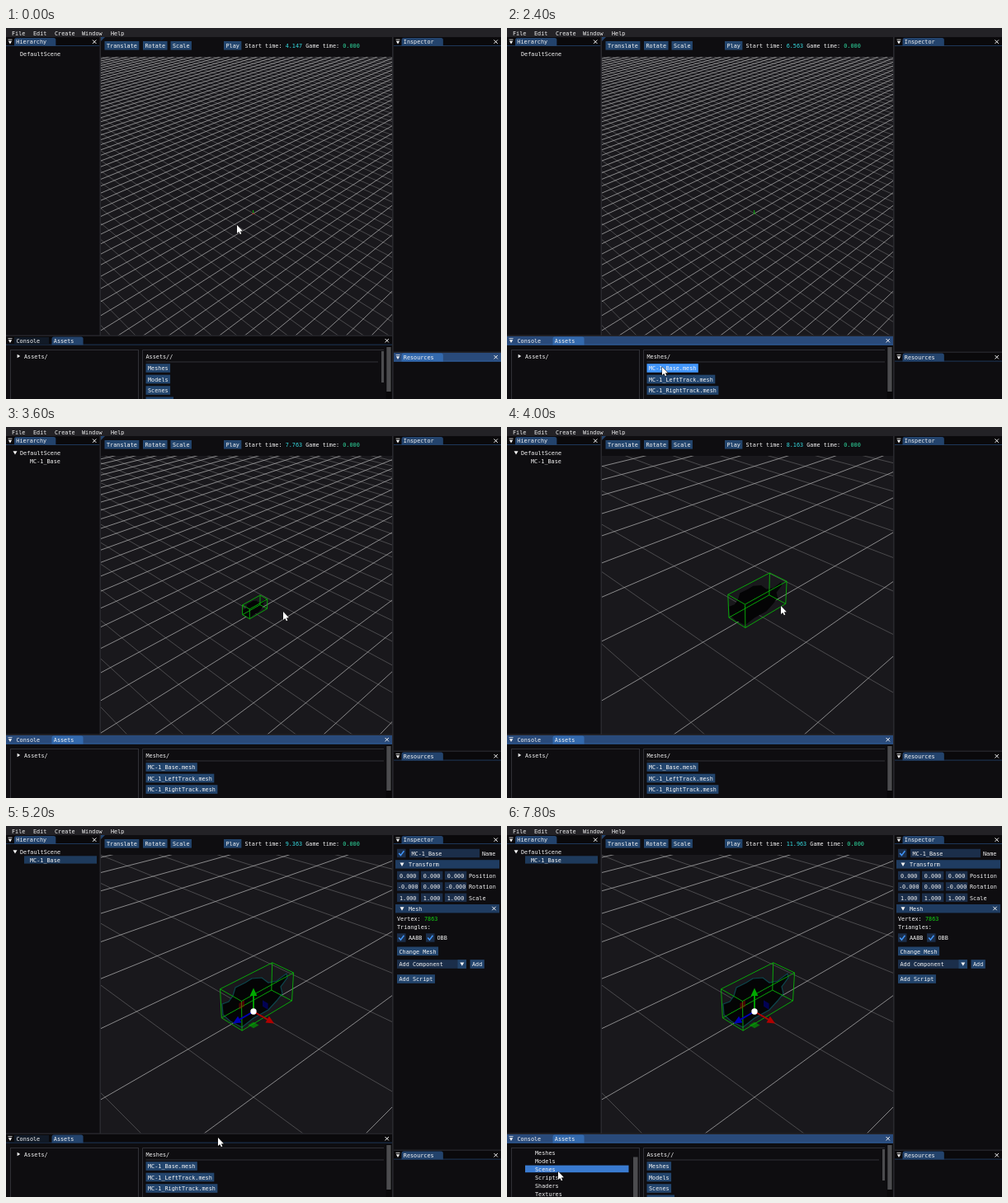
These frames come from a looping animation (600x450 px, 8000 ms). An HTML page with a canvas:

```html
<!DOCTYPE html>
<html lang="en">
<head>
<meta charset="utf-8">
<title>Scene editor</title>
<style>
html, body { margin: 0; width: 100%; height: 100%; overflow: hidden; background: #0e0d10; }
canvas { display: block; width: 600px; height: 450px; }
</style>
</head>
<body>
<canvas id="stage" width="600" height="450"></canvas>
<script>
const ctx = document.getElementById('stage').getContext('2d');
const LOOP = 8000, STEP = 200, FOCAL = 543;
const CHAR = 4.095;
const WHITE = '#f4f4f4', PANEL = '#0e0d10', BUTTON = '#23456d', BAR = '#294a7a';
const TAB = '#23436c', TAB_ON = '#3369ad', FRAME = '#1b2e4a', EDGE = '#303036';

// Moments at which the interface changes, in ms
const AT = { folder: 2200, drop: 2800, select: 4800, tree: 7000, scroll: 7400 };

// time, x, y
const cursorPath = [
  [0, 280, 239], [600, 262, 264], [1200, 190, 388], [1600, 181, 404], [2000, 184, 410],
  [2400, 188, 411], [2800, 300, 238], [3200, 340, 231], [4000, 332, 217],
  [4600, 306, 212], [5200, 257, 378], [6000, 100, 388], [6800, 14, 396],
  [7200, 15, 397], [7800, 62, 419]
];
// time, camera coordinate on all three axes, in grid cells
const NEAREST = 3.13;
const zoomPath = [[0, 20], [3200, 20], [3400, 14], [3600, 9], [3800, 5.8], [4000, 3.88], [4200, NEAREST]];

// Model silhouette at the nearest zoom
const body = [
  [262, 216], [270, 213], [275, 206], [278, 196], [290, 190], [298, 185], [310, 184],
  [318, 190], [328, 188], [340, 179], [341, 184], [333, 195], [335, 203], [328, 212],
  [318, 223], [300, 233], [286, 244], [272, 237], [263, 229]
];

function sample(path, t) {
  const i = path.findIndex(p => p[0] > t);
  if (i < 0) return path[path.length - 1].slice(1);
  const a = path[i - 1], b = path[i], k = (t - a[0]) / (b[0] - a[0]);
  return a.slice(1).map((v, j) => v + (b[j + 1] - v) * k);
}

function box(x0, y0, x1, y1, color) {
  ctx.fillStyle = color;
  ctx.fillRect(x0, y0, x1 - x0, y1 - y0);
}

function outline(x0, y0, x1, y1) {
  ctx.strokeStyle = EDGE;
  ctx.lineWidth = 1;
  ctx.strokeRect(x0 + .5, y0 + .5, x1 - x0, y1 - y0);
}

// Large type scaled down keeps fractional advances
function text(str, x, cy, color = WHITE) {
  ctx.save();
  ctx.translate(x, cy + 2.7);
  ctx.scale(.1, .1);
  ctx.font = '68px "DejaVu Sans Mono", monospace';
  ctx.fillStyle = color;
  ctx.fillText(str, 0, 0);
  ctx.restore();
}

function line(points, color, width = 1, close = false) {
  ctx.beginPath();
  points.forEach(p => ctx.lineTo(p[0], p[1]));
  if (close) ctx.closePath();
  ctx.strokeStyle = color;
  ctx.lineWidth = width;
  ctx.stroke();
}

function poly(points, color) {
  ctx.beginPath();
  points.forEach(p => ctx.lineTo(p[0], p[1]));
  ctx.closePath();
  ctx.fillStyle = color;
  ctx.fill();
}

function clip(x0, y0, x1, y1, paint) {
  ctx.save();
  ctx.beginPath();
  ctx.rect(x0, y0, x1 - x0, y1 - y0);
  ctx.clip();
  paint();
  ctx.restore();
}

const arrowDown = (x, y, r = 2.5) => poly([[x - r, y - r * .75], [x + r, y - r * .75], [x, y + r]], WHITE);
const arrowRight = (x, y) => poly([[x - 1.4, y - 2.2], [x + 2.2, y], [x - 1.4, y + 2.2]], WHITE);

function cross(x, y) {
  line([[x - 2.2, y - 2.2], [x + 2.2, y + 2.2]], WHITE);
  line([[x + 2.2, y - 2.2], [x - 2.2, y + 2.2]], WHITE);
}

function button(label, x, cy, mouse) {
  const x1 = x + label.length * CHAR + 5;
  const hot = mouse[0] > x && mouse[0] < x1 && Math.abs(mouse[1] - cy) < 5.3;
  box(x, cy - 5.3, x1, cy + 5.3, hot ? '#4296fa' : BUTTON);
  text(label, x + 2.5, cy);
}

function check(x, cy) {
  box(x, cy - 5.2, x + 10.5, cy + 5.2, FRAME);
  line([[x + 2.2, cy], [x + 4.4, cy + 2.6], [x + 8.4, cy - 2.8]], '#4296fa', 1.5);
}

function titleBar(x0, x1, y, focused, tabX, label) {
  const color = focused ? TAB_ON : TAB, tabEnd = tabX + label.length * CHAR + 13.5;
  box(x0, y, x1, y + 10.5, focused ? BAR : '#0a090b');
  box(x0, y + 9.7, x1, y + 10.5, color);
  ctx.fillStyle = color;
  ctx.beginPath();
  ctx.roundRect(tabX, y + .6, tabEnd - tabX, 9.9, [2.5, 2.5, 0, 0]);
  ctx.fill();
  arrowDown(x0 + 5, y + 5.9, 2.2);
  line([[x0 + 2.5, y + 2.6], [x0 + 7.5, y + 2.6]], WHITE, .8);
  text(label, tabX + 2.3, y + 5.2);
  cross(x1 - 6.3, y + 5.2);
}

function project(c, x, y, z) {
  const depth = (3 * c - x - y - z) / Math.sqrt(3), s = FOCAL / depth;
  return [300 + (x - z) / Math.SQRT2 * s, 225 - (2 * y - x - z) / Math.sqrt(6) * s];
}

function drawGrid(c) {
  for (let n = -80; n <= 80; n++) {
    const near = Math.min(300, 3 * c - n - .5);
    line([project(c, -400, 0, n), project(c, near, 0, n)], 'rgba(190,190,190,.38)', .8);
    line([project(c, n, 0, -400), project(c, n, 0, near)], 'rgba(205,205,205,.75)', .85);
  }
}

function drawModel(c, selected) {
  const k = NEAREST / c;
  const shape = body.map(([x, y]) => [300 + (x - 300) * k, 225 + (y - 225) * k]);
  poly(shape, '#040405');
  if (selected) line(shape, '#0c454c', 1.2, true);
  const ring = y => [[-.175, .36], [.175, .36], [.175, -.505], [-.175, -.505]]
    .map(([x, z]) => project(c, x, y, z));
  const low = ring(0), high = ring(.405);
  const green = '#08b408';
  line(low, green, .9, true);
  line(high, green, .9, true);
  low.forEach((p, i) => line([p, high[i]], green, .9));
}

function drawGizmo() {
  const X = [22, 12.7], Y = [0, -25], Z = [-22, 12.7];
  const at = (u, a, v = u, b = 0) => [300 + u[0] * a + v[0] * b, 225 + u[1] * a + v[1] * b];
  const plane = (u, v, color) =>
    poly([[.5, .5], [.8, .5], [.8, .8], [.5, .8]].map(([a, b]) => at(u, a, v, b)), color);
  plane(Y, Z, 'rgba(170,0,0,.42)');
  plane(X, Y, 'rgba(0,0,190,.42)');
  plane(Z, X, 'rgba(0,170,0,.6)');
  [[X, '#b00000'], [Y, '#00aa00'], [Z, '#0000b4']].forEach(([u, color]) => {
    const len = Math.hypot(...u), nx = -u[1] / len * 4.4, ny = u[0] / len * 4.4, b = at(u, .76);
    line([[300, 225], b], color, 1.8);
    poly([at(u, 1.14), [b[0] + nx, b[1] + ny], [b[0] - nx, b[1] - ny]], color);
  });
  ctx.beginPath();
  ctx.arc(300, 225, 3.7, 0, Math.PI * 2);
  ctx.fillStyle = '#fff';
  ctx.fill();
}

function drawScene(t, mouse) {
  box(115, 11, 468, 35, PANEL);
  poly([[115, 11], [120, 11], [115, 16]], TAB);
  [['Translate', 119.5], ['Rotate', 166], ['Scale', 199.5], ['Play', 264]]
    .forEach(([label, x]) => button(label, x, 21.3, mouse));
  const clock = ((t < 2400 ? 4147 : 4163) + t) / 1000;
  let x = 289.5;
  [['Start time: ', WHITE], [clock.toFixed(3) + ' ', '#35dbe0'], ['Game time: ', WHITE], ['0.000', '#2fdda2']]
    .forEach(([str, color]) => { text(str, x, 21.6, color); x += str.length * CHAR; });

  box(115, 35, 468, 372.5, '#19181c');
  clip(115, 35, 468, 372.5, () => {
    const [c] = sample(zoomPath, t);
    drawGrid(c);
    if (t >= AT.drop) drawModel(c, t >= AT.select);
    else {
      line([[300, 225], [299.5, 221]], '#0cb40c');
      line([[298, 225], [301.5, 225.5]], t < 1400 ? '#a02020' : '#1d7a1d');
    }
    if (t >= AT.select) drawGizmo();
  });
}

function drawHierarchy(t) {
  titleBar(0, 113.5, 11.5, false, 10, 'Hierarchy');
  if (t >= AT.select) box(22, 36.3, 110, 45.6, '#1e3a5c');
  text('DefaultScene', 17, 31);
  if (t >= AT.drop) {
    arrowDown(11, 31);
    text('MC-1_Base', 29, 41);
  }
}

function drawInspector(t, mouse) {
  titleBar(470, 600, 11.5, false, 479.5, 'Inspector');
  if (t < AT.select) return;
  check(474, 33);
  box(489, 27.8, 574, 38.2, FRAME);
  text('MC-1_Base', 491.5, 33);
  text('Name', 577, 33);
  [[46.4, 'Transform'], [100.2, 'Mesh']].forEach(([y, label]) => {
    box(472, y - 5.2, 598, y + 5.2, '#1f3c61');
    arrowDown(480, y);
    text(label, 488, y);
  });
  cross(591.5, 100);
  const rows = [['Position', '0.000', '0.000', '0.000'], ['Rotation', '-0.000', '0.000', '-0.000'], ['Scale', '1.000', '1.000', '1.000']];
  rows.forEach(([label, ...values], r) => {
    const y = 60 + r * 13.4;
    values.forEach((v, i) => {
      const x = 474 + i * 28.9;
      box(x, y - 5.2, x + 26.5, y + 5.2, FRAME);
      text(v, x + 13.2 - v.length * CHAR / 2, y);
    });
    text(label, 561, y);
  });
  text('Vertex:', 474, 112);
  text('7863', 507, 112, '#12d412');
  text('Triangles:', 474, 122);
  check(474, 135.5);
  text('AABB', 488, 135.5);
  check(509, 135.5);
  text('OBB', 522.5, 135.5);
  button('Change Mesh', 474, 151.8, mouse);
  box(474, 162.2, 558, 172.8, FRAME);
  box(547.5, 162.2, 558, 172.8, BUTTON);
  arrowDown(552.8, 167.3);
  text('Add Component', 476.5, 167.5);
  button('Add', 562.5, 167.5, mouse);
  button('Add Script', 474, 185.5, mouse);
}

function drawTree(t) {
  const open = t >= AT.tree, scrolled = t >= AT.scroll, dy = scrolled ? -12 : 0;
  clip(5, 391, 161, 450, () => {
    if (t >= 6600 && !scrolled) box(9, 393.8, 156, 402.6, '#3a7bd0');
    (open ? arrowDown : arrowRight)(15, 398 + dy);
    text('Assets/', 22, 398 + dy);
    if (!open) return;
    ['Meshes', 'Models', 'Scenes', 'Scripts', 'Shaders', 'Textures'].forEach((name, i) => {
      const y = 408 + dy + i * 10;
      if (t >= 7600 && i === 2) box(22, y - 4.4, 147.5, y + 4.2, '#3a7bd0');
      text(name, 34, y);
    });
    box(153, scrolled ? 401.5 : 392, 158.5, scrolled ? 450 : 440, '#4c4c4f');
  });
}

function drawAssets(t, mouse) {
  const focused = t >= AT.folder && t < AT.select || t >= AT.tree;
  const inMeshes = t >= AT.folder && t < AT.tree;
  titleBar(0, 468, 374, focused, 55.5, 'Assets');
  if (!focused) box(10, 375, 52, 383.7, '#111a27');
  text('Console', 12.5, 379.5);

  outline(5, 390, 160, 455);
  drawTree(t);
  line([[165.5, 450], [165.5, 390.5], [458, 390.5]], EDGE);
  text(inMeshes ? 'Meshes/' : 'Assets//', 169.5, 398.3);
  line([[169.5, 405], [inMeshes ? 458 : 451, 405]], EDGE);
  const items = inMeshes
    ? ['MC-1_Base.mesh', 'MC-1_LeftTrack.mesh', 'MC-1_RightTrack.mesh']
    : ['Meshes', 'Models', 'Scenes'];
  items.forEach((label, i) => button(label, 169.5, 412.5 + i * 13.5, mouse));
  if (!inMeshes) {
    box(169.5, 447.5, 203, 450, BUTTON);
    box(455, 392, 458, 430, '#4c4c4f');
  }
  box(460.5, 386, 467.5, 450, '#09080a');
  box(461.3, 387, 466.6, 441, '#4c4c4f');
}

function drawCursor([x, y]) {
  const p = [[0, 0], [0, 10], [2.3, 7.9], [3.9, 11.3], [5.3, 10.6], [3.8, 7.4], [6.9, 7.2]]
    .map(([a, b]) => [x + a, y + b]);
  line(p, '#111', 1, true);
  poly(p, '#fff');
}

function draw(t) {
  const mouse = sample(cursorPath, t);
  box(0, 0, 600, 450, PANEL);
  box(0, 0, 600, 11, '#232226');
  [['File', 7], ['Edit', 33], ['Create', 59], ['Window', 92], ['Help', 127]]
    .forEach(([label, x]) => text(label, x, 6));
  drawHierarchy(t);
  drawScene(t, mouse);
  drawInspector(t, mouse);
  drawAssets(t, mouse);
  titleBar(470, 600, 394, t < AT.folder, 479.5, 'Resources');
  box(113.5, 11, 115, 373, '#29292e');
  box(468, 11, 469.6, 450, '#29292e');
  box(0, 372.5, 468, 373.8, '#29292e');
  box(470, 392.6, 600, 393.8, '#29292e');
  drawCursor(mouse);
}

const start = performance.now();
let shown = -1;
function tick() {
  const t = Math.floor((performance.now() - start) % LOOP / STEP) * STEP;
  if (t !== shown) draw(shown = t);
  requestAnimationFrame(tick);
}
tick();
</script>
</body>
</html>
```
